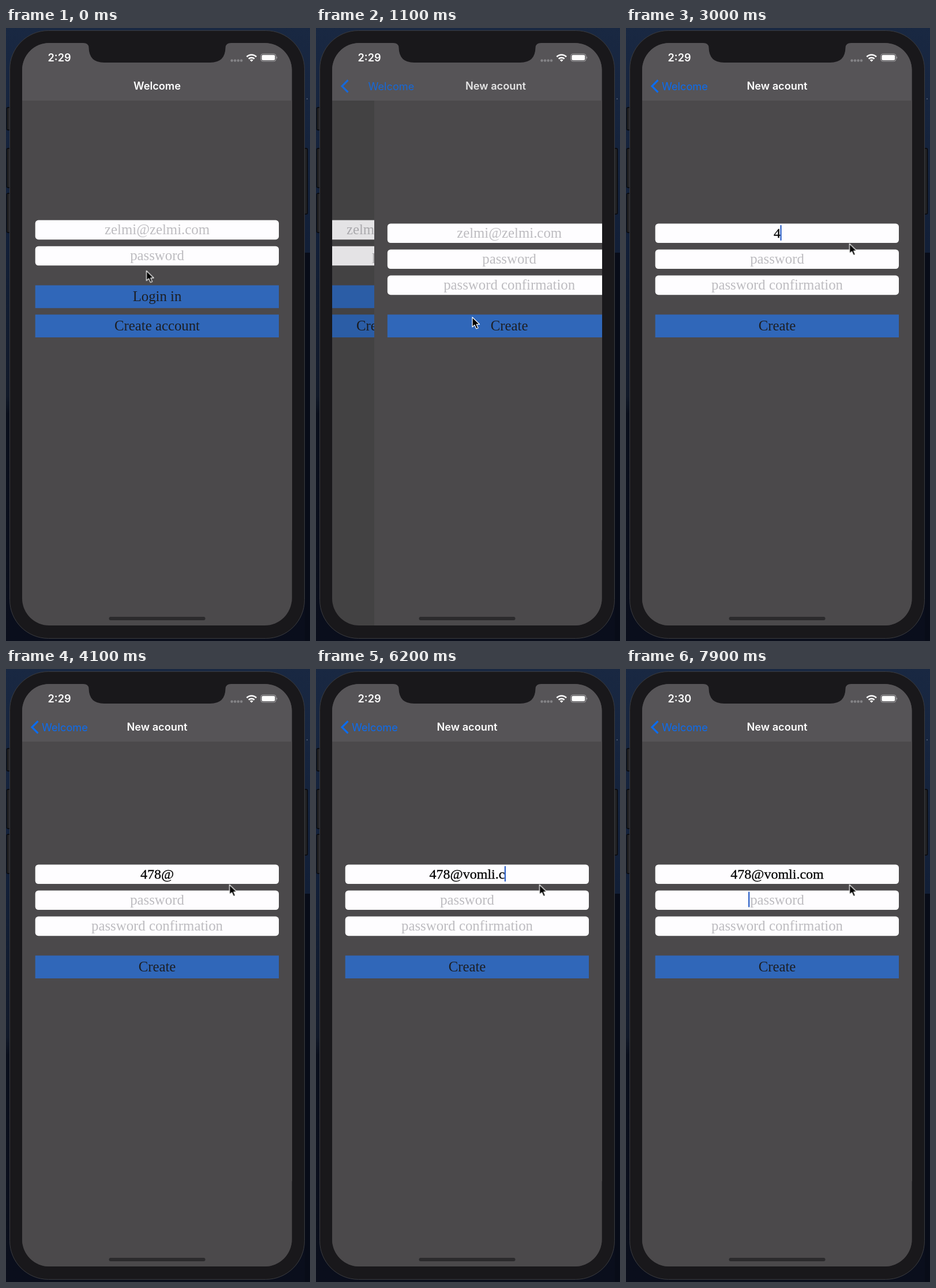
An HTML page that plays this animation: 527x1064 px, repeating every 8 s.

```html
<!DOCTYPE html>
<html lang="en">
<head>
<meta charset="utf-8">
<title>Sign-up screen</title>
<style>
  html, body { margin: 0; width: 100%; height: 100%; overflow: hidden; background: #0b1224; }
  svg { display: block; width: 527px; height: 1064px; }
  text { white-space: pre; }
  .ui { font-family: Inter, Roboto, sans-serif; font-size: 18.2px; fill: #fff; }
  .bold { font-weight: 600; }
  .mid { text-anchor: middle; }
  .serif { font-family: "Liberation Serif", "Noto Serif", serif; font-size: 24.8px; text-anchor: middle; }
  .hint { fill: #bdbcc0; }
  .label { fill: #1d1f24; }
  .typed { fill: #000; stroke: #000; stroke-width: .3px; font-size: 24px; }
  .field { fill: #fefdff; }
  .button { fill: #3067b9; }
  .body { fill: #4b494b; }
  .caret { fill: #2f62c8; }
  .blue { fill: #0b6cf0; }

  .anim { animation: 8s linear infinite; }

  #cursor { animation-name: cursor; }
  @keyframes cursor {
    0%, 1.25% { transform: translate(243.5px, 421.5px); animation-timing-function: ease-in-out; }
    8.75%, 15% { transform: translate(271px, 502px); animation-timing-function: ease-in-out; }
    21.875%, 26.25% { transform: translate(270.5px, 350px); animation-timing-function: ease-in-out; }
    33.75%, 100% { transform: translate(387.5px, 374.5px); }
  }

  #press { animation-name: press; }
  @keyframes press {
    0%, 9.5% { opacity: 1; }
    9.9%, 11.2% { opacity: .3; }
    13%, 100% { opacity: 1; }
  }

  /* Push transition: 930 ms to 1430 ms */
  #welcome { animation-name: leave; }
  @keyframes leave {
    0%, 11.625% { transform: none; animation-timing-function: cubic-bezier(.36, .66, .04, 1); }
    17.875%, 100% { transform: translateX(-140px); }
  }
  #dim { animation-name: dim; }
  @keyframes dim {
    0%, 11.625% { opacity: 0; animation-timing-function: cubic-bezier(.36, .66, .04, 1); }
    17.875%, 100% { opacity: .12; }
  }
  #signup { animation-name: enter; }
  @keyframes enter {
    0%, 11.625% { transform: translateX(467px); animation-timing-function: cubic-bezier(.36, .66, .04, 1); }
    17.875%, 100% { transform: none; }
  }
  #oldTitle { animation-name: oldTitle; }
  @keyframes oldTitle {
    0%, 11.3% { transform: none; opacity: 1; animation-timing-function: ease-in; }
    13.5%, 100% { transform: translateX(-130px); opacity: 0; }
  }
  #newTitle { animation-name: newTitle; }
  @keyframes newTitle {
    0%, 11.625% { transform: translateX(316px); opacity: 0; animation-timing-function: cubic-bezier(.36, .66, .04, 1); }
    17.875%, 100% { transform: none; opacity: 1; }
  }
  #back { animation-name: back; }
  @keyframes back {
    0%, 11.625% { transform: translateX(182px); opacity: 0; animation-timing-function: cubic-bezier(.36, .66, .04, 1); }
    17.875%, 100% { transform: none; opacity: 1; }
  }
  #chevron { animation-name: chevron; }
  @keyframes chevron {
    0%, 11.625% { opacity: 0; animation-timing-function: cubic-bezier(.36, .66, .04, 1); }
    17.875%, 100% { opacity: 1; }
  }

  #keyboard { animation-name: keyboard; }
  @keyframes keyboard {
    0%, 86.9% { transform: translateY(76px); animation-timing-function: ease-out; }
    88.5%, 89.5% { transform: none; animation-timing-function: ease-in-out; }
    92.5%, 100% { transform: translateY(76px); }
  }
  #home { animation-name: home; }
  @keyframes home {
    0%, 87.2% { fill: #2b2a2c; }
    88%, 91% { fill: #000; }
    92.5%, 100% { fill: #2b2a2c; }
  }
</style>
</head>
<body>
<svg viewBox="0 0 527 1064">
  <defs>
    <linearGradient id="sky" x2="0" y2="1">
      <stop offset="0" stop-color="#192842"/>
      <stop offset=".36" stop-color="#121f37"/>
      <stop offset=".6" stop-color="#111929"/>
      <stop offset=".63" stop-color="#090e1b"/>
      <stop offset="1" stop-color="#0a0e1c"/>
    </linearGradient>
    <clipPath id="screen"><rect x="28" y="26" width="467.5" height="1011" rx="47"/></clipPath>
  </defs>

  <rect width="527" height="1064" fill="url(#sky)"/>
  <rect x="518" y="390" width="9" height="674" fill="#080c18"/>
  <circle cx="522" cy="123" r=".8" fill="#8590a5"/>

  <g fill="#232326" stroke="#09090b" stroke-width="1.5">
    <rect x="1.5" y="138" width="10" height="39" rx="2"/>
    <rect x="1.5" y="209" width="10" height="68" rx="2"/>
    <rect x="1.5" y="287" width="10" height="68" rx="2"/>
    <rect x="512" y="209" width="10.5" height="114" rx="2"/>
  </g>
  <rect x="6.5" y="4.5" width="511" height="1055" rx="67" fill="#19181b" stroke="#3b3c40"/>

  <g clip-path="url(#screen)">
    <rect class="body" x="28" y="26" width="468" height="1012"/>

    <g id="welcome" class="anim">
      <rect class="field" x="50.7" y="333.6" width="422.3" height="33.6" rx="5.5"/>
      <text class="serif hint" x="262" y="358">zelmi@zelmi.com</text>
      <rect class="field" x="50.7" y="378.7" width="422.3" height="33.6" rx="5.5"/>
      <text class="serif hint" x="262" y="403">password</text>
      <rect class="button" x="50.7" y="446.6" width="422.3" height="39.6"/>
      <text class="serif label" x="262" y="474">Login in</text>
      <rect class="button" x="50.7" y="497.4" width="422.3" height="39.6"/>
      <text id="press" class="serif label anim" x="262" y="525">Create account</text>
    </g>
    <rect id="dim" class="anim" x="28" y="126" width="468" height="912"/>

    <g id="signup" class="anim">
      <rect class="body" x="28" y="126" width="468" height="912"/>
      <rect class="field" x="50.7" y="339.4" width="422.3" height="33.6" rx="5.5"/>
      <text id="hint" class="serif hint" x="262" y="364">zelmi@zelmi.com</text>
      <text id="email" class="serif typed" x="262" y="364"></text>
      <rect class="field" x="50.7" y="384.5" width="422.3" height="33.6" rx="5.5"/>
      <text id="pass" class="serif hint" x="262" y="409">password</text>
      <rect class="field" x="50.7" y="429.6" width="422.3" height="33.6" rx="5.5"/>
      <text class="serif hint" x="262" y="454">password confirmation</text>
      <rect class="button" x="50.7" y="497.4" width="422.3" height="39.6"/>
      <text class="serif label" x="262" y="525">Create</text>
      <rect id="caret" class="caret" y="342" width="2.3" height="27" rx="1" opacity="0"/>
    </g>

    <rect x="28" y="26" width="468" height="100" fill="#565457"/>
    <text id="oldTitle" class="ui bold mid anim" x="262" y="107">Welcome</text>
    <text id="newTitle" class="ui bold mid anim" x="262" y="107">New acount</text>
    <text id="back" class="ui blue anim" x="62" y="107.5">Welcome</text>
    <path id="chevron" class="anim" d="M55.5 90.5L45 101L55.5 111.5" fill="none" stroke="#0b6cf0" stroke-width="3.2"/>

    <rect id="keyboard" class="anim" x="28" y="962" width="468" height="76" fill="#c7c6ce"/>
    <rect id="home" class="anim" x="178.5" y="1022" width="167" height="6" rx="3" fill="#2b2a2c"/>
  </g>

  <path d="M134 25V26Q143 26 143.5 34Q144 60 170 60H354Q380 60 380.5 34Q381 26 390 26V25Z" fill="#19181b"/>

  <text id="clock" class="ui bold" x="72.5" y="58">2:29</text>
  <g fill="#858487">
    <circle cx="391.5" cy="56.5" r="2.2"/>
    <circle cx="397" cy="56.5" r="2.2"/>
    <circle cx="402.5" cy="56.5" r="2.2"/>
    <circle cx="408" cy="56.5" r="2.2"/>
  </g>
  <g fill="none" stroke="#fff" stroke-width="2.5">
    <path d="M417.3 50A11.8 11.8 0 0 1 434 50"/>
    <path d="M420.7 53.5A7 7 0 0 1 430.6 53.5"/>
  </g>
  <path d="M422.8 55.7A4 4 0 0 1 428.5 55.7L425.65 58.6Z" fill="#fff"/>
  <rect x="441.7" y="45" width="26.2" height="12.8" rx="3.6" fill="none" stroke="#a5a4a7"/>
  <rect x="443.4" y="46.7" width="22.8" height="9.4" rx="2" fill="#fff"/>
  <path d="M469 49.3Q471.4 51.4 469 53.5Z" fill="#a5a4a7"/>

  <path id="cursor" class="anim" d="M0 0V17L4 13.4L7 20L10 18.7L7.2 12.3H12.5Z"
    fill="#000" stroke="#fff" stroke-width="1.2" stroke-linejoin="round"/>
</svg>

<script>
  const LOOP = 8000, CENTER = 262;
  const ADDRESS = "478@vomli.com";
  const KEYS = [2900, 3100, 3300, 3550, 4600, 4800, 5000, 5200, 5400, 5800, 6100, 6400, 6600];
  const FOCUS = 1850, LEAVE = 7000, NEXT_FOCUS = 7550, MINUTE = 7600;
  const [hint, email, pass, caret, clock] =
    ["hint", "email", "pass", "caret", "clock"].map(id => document.getElementById(id));

  const clamp = v => Math.max(0, Math.min(1, v));
  const halfWidth = node => node.getComputedTextLength() / 2;

  function setText(node, value) {
    if (node.textContent !== value) node.textContent = value;
  }

  // Caret stays solid after each key, then blinks once a second
  function blink(age) {
    const a = age % 1000;
    return a < 700 ? clamp((500 - a) / 100) : clamp((a - 850) / 100);
  }

  function placeCaret(x, y, opacity) {
    caret.setAttribute("x", x - 1.15);
    caret.setAttribute("y", y);
    caret.setAttribute("opacity", opacity);
  }

  function render(t) {
    const count = KEYS.filter(k => k <= t).length;
    setText(email, ADDRESS.slice(0, count));
    hint.setAttribute("visibility", count ? "hidden" : "inherit");
    setText(clock, t < MINUTE ? "2:29" : "2:30");

    if (t >= NEXT_FOCUS) {
      placeCaret(CENTER - halfWidth(pass) - 2, 386.5, blink(t - NEXT_FOCUS));
    } else if (t < FOCUS || t >= LEAVE) {
      placeCaret(CENTER, 342, 0);
    } else if (count) {
      placeCaret(CENTER + halfWidth(email) + .5, 342, blink(t - KEYS[count - 1]));
    } else {
      placeCaret(CENTER - halfWidth(hint) - 2, 342, blink(t - FOCUS));
    }
  }

  let start;
  function tick(now) {
    start ??= now;
    render((now - start) % LOOP);
    requestAnimationFrame(tick);
  }
  requestAnimationFrame(tick);
</script>
</body>
</html>
```
